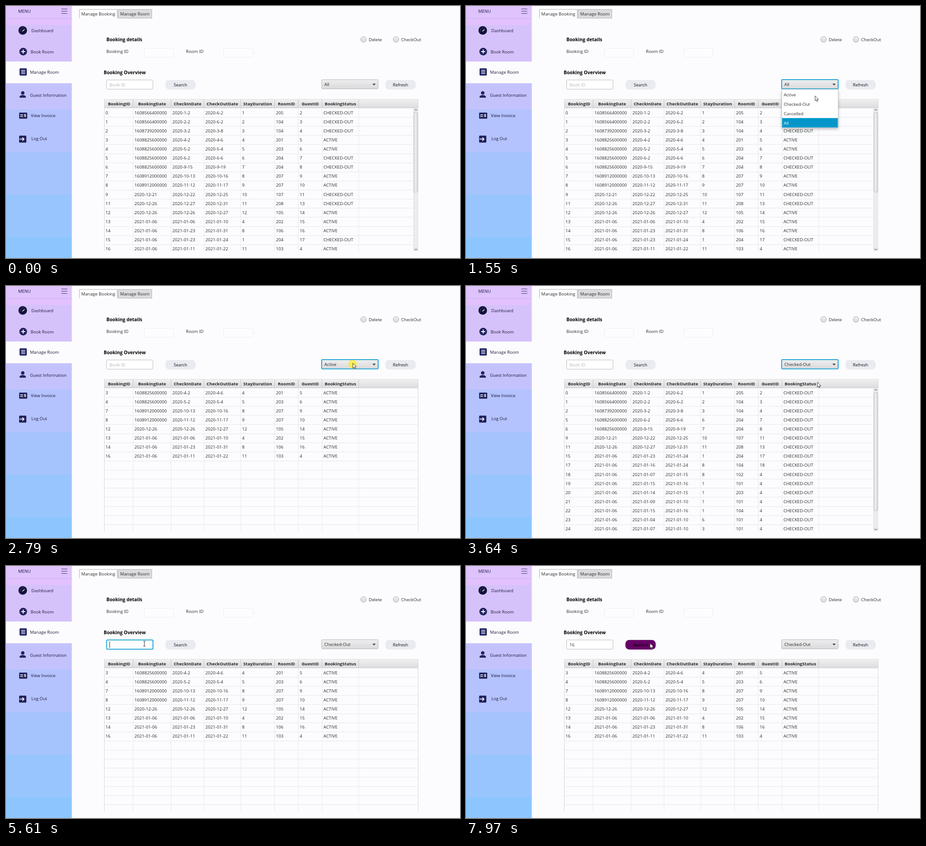
Animation, 1004 px wide and 558 px high, one loop 8000 ms. Source, as an HTML page:

```html
<!DOCTYPE html>
<html lang="en">
<head>
<meta charset="utf-8">
<title>Manage bookings</title>
<style>
html, body { margin: 0; width: 100%; height: 100%; overflow: hidden; background: #fcfcfe; }
svg { display: block; width: 1004px; height: 558px; }
text { font: 9.65px "Open Sans", "Noto Sans", sans-serif; fill: #2b2b2b; white-space: pre; }
.side text { font-size: 9.5px; fill: #1c1b3c; }
.bold { font-weight: 700; }
.title { font-size: 10.3px; fill: #000; }
.head { font-size: 9.6px; fill: #262626; }
.mid { text-anchor: middle; }
.btn text { font-size: 9.5px; fill: #111; }
.hint { fill: #b4b4b8; }
</style>
</head>
<body>
<svg id="stage" viewBox="0 0 1004 558" xmlns="http://www.w3.org/2000/svg"></svg>
<script>
const LOOP = 8000;
const $ = id => document.getElementById(id);
const rect = (x, y, w, h, fill, more = '') =>
  `<rect x="${x}" y="${y}" width="${w}" height="${h}" fill="${fill}" ${more}/>`;
const text = (x, y, str, cls = '') => `<text x="${x}" y="${y}" class="${cls}">${str}</text>`;
const path = (d, more) => `<path d="${d}" ${more}/>`;
const circle = (x, y, r, more) => `<circle cx="${x}" cy="${y}" r="${r}" ${more}/>`;
const fade = (id, stops, dir = 'x2="0" y2="1"') => `<linearGradient id="${id}" ${dir}>` +
  stops.map((c, i) => `<stop offset="${i / (stops.length - 1)}" stop-color="${c}"/>`).join('') +
  '</linearGradient>';

const NAVY = '#23235f', BLUE = '#0496c9', LINE = '#e7e7ea';

// Bookings: check-in, check-out, room and, for January 2021, the stay
const bookings = `1-2 6-2 205|2-2 6-2 104|3-2 3-8 104|4-2 4-6 201|5-2 5-4 203|6-2 6-6 204
9-15 9-19 204|10-13 10-16 207|11-12 11-17 207|12-22 12-25 107|12-27 12-31 208|12-26 12-27 105
06 10 202 4|23 31 106 8|23 24 204 1|11 22 103 11|16 24 104 8|07 15 102 8|15 16 101 1
14 15 203 1|09 10 101 1|15 16 104 1|04 10 101 6|07 10 101 3`.split(/[|\n]/).map((line, i) => {
  const [from, to, room, stay = i + 1] = line.split(' ');
  const id = i + (i > 9);
  const year = id < 13 ? '2020-' : '2021-01-';
  const active = [3, 4, 7, 8, 12, 13, 14, 16].includes(id);
  const guest = id < 16 ? id + 2 : id === 17 ? 18 : 4;
  return [id, bookedOn(id), year + from, year + to, stay, room, guest,
    active ? 'ACTIVE' : 'CHECKED-OUT'];
});

function bookedOn(id) {
  if (id < 2) return '1608566400000';
  if (id < 3) return '1608739200000';
  if (id < 7) return '1608825600000';
  if (id < 9) return '1608912000000';
  return id < 10 ? '2020-12-21' : id < 13 ? '2020-12-26' : '2021-01-06';
}

const edges = [217, 281, 365, 438, 519, 594, 646.5, 699, 780];
const heads = ['BookingID', 'BookingDate', 'CheckInDate', 'CheckOutDate', 'StayDuration',
  'RoomID', 'GuestID', 'BookingStatus'];
const PITCH = 20.12;

function rowsOf(id, list, thumbEnd) {
  let out = `<g id="${id}">`;
  list.slice(0, 16).forEach((row, r) => row.forEach((cell, c) => {
    out += text(edges[c] + 3.1, 239.5 + r * PITCH, cell);
  }));
  if (thumbEnd) {
    out += rect(901, 226, 11, 317, '#ececee') +
      path('M901.5 226V543', 'stroke="#dcdcde"') +
      rect(902.5, 235.5, 8, thumbEnd - 235.5, 'url(#thumb)', 'rx="2" stroke="#bcbcbe"') +
      path('M903.5 231.5l3-3 3 3M903.5 537.5l3 3 3-3', 'fill="none" stroke="#777" stroke-width="1.2"');
  }
  return out + '</g>';
}

function grid() {
  let d = '';
  for (let r = 1; r < 16; r++) d += `M217 ${Math.round(226 + r * PITCH) + .5}H912`;
  edges.slice(1).forEach(x => d += `M${x} 226V543`);
  let hd = '';
  edges.slice(1).forEach(x => hd += `M${x} 207V225`);
  return path(d, `stroke="${LINE}" fill="none"`) +
    rect(217, 206, 695, 20, 'url(#head)') +
    path(hd, 'stroke="#c6c6c8"') +
    path('M217 206H912M217 225.7H912', 'stroke="#cfcfd1"') +
    path('M217.5 206V543M911.5 206V543', 'stroke="#d6d6d8"') +
    heads.map((h, i) => text((edges[i] + edges[i + 1]) / 2 + (i ? 0 : 1), 219.6, h, 'bold head mid')).join('');
}

function sidebar() {
  const bands = [[0, '#dfc3fd'], [27, '#e2c1fe'], [42, '#d6c2fb'], [123, '#fcfcfe'], [171, '#c4c2fc'],
    [229, '#b4c2fd'], [324, '#a5c3fc'], [418, '#98c5fd'], [512, '#8dc6fe']];
  const white = w => `fill="none" stroke="#fff" stroke-width="${w}"`;
  return '<g class="side">' +
    bands.map(([y, c], i) => rect(0, y, 145.5, (bands[i + 1] || [558])[0] - y, c)).join('') +
    path('M0 27.5H145.5', 'stroke="#cbb2ea"') +
    path('M122.5 6.5H135.5M122.5 11.5H135.5M122.5 16.5H135.5', 'stroke="#3a3560" stroke-width="1.2"') +
    text(27, 14.5, 'MENU') +
    circle(37, 54, 9.5, 'fill="#12103a"') +
    path('M36 56l5-4', white(1.6)) +
    path('M31.5 56a6 6 0 0 1 10-6', 'fill="none" stroke="#cfc6ee" stroke-dasharray="1 2.4"') +
    text(56, 57.7, 'Dashboard') +
    circle(38, 101, 8.5, `fill="${NAVY}"`) +
    path('M33.5 101h9M38 96.5v9', white(1.8)) +
    text(54.5, 104.7, 'Book Room') +
    rect(30, 138, 16, 16, NAVY, 'rx="2"') +
    path('M33.5 142.5h9M33.5 146h9M33.5 149.5h9', white(1.5)) +
    text(53, 150.2, 'Manage Room') +
    circle(37, 192.5, 3.8, `fill="${NAVY}"`) +
    path('M30 203v-1.5c0-3 4-4.3 7-4.3s7 1.3 7 4.3v1.5z', `fill="${NAVY}"`) +
    text(53, 201.2, 'Guest Information') +
    rect(29, 236, 18, 13.5, NAVY, 'rx="1.5"') +
    path('M31.5 241h6M31.5 244.5h6', white(1.4)) +
    '<text x="39.5" y="246.3" class="bold" style="fill:#fff">$</text>' +
    text(55, 246.2, 'View Invoice') +
    rect(29, 287, 16, 15.5, NAVY, 'rx="1.5"') +
    path('M30 294.7h9.5M36 291l3.8 3.7-3.8 3.7', white(1.7)) +
    text(56, 296.7, 'Log Out') + '</g>';
}

const button = (id, x, label) => `<g class="btn">` +
  `<rect id="${id}" x="${x}" y="163.7" width="67" height="21.3" rx="8.5"/>` +
  `<text id="${id}Text" x="${x + 33.5}" y="177.6" class="mid">${label}</text></g>`;
const radio = (x, label) => circle(x, 74, 6.3, 'fill="url(#knob)" stroke="#adadaf"') +
  text(x + 11.5, 77.7, label);
const field = x => rect(x, 93.5, 64, 20, '#fdfdff', 'rx="2" stroke="#ededf1"');

const choices = ['Active', 'Checked-Out', 'Cancelled', 'All'];
const popup = '<g id="popup">' +
  rect(698.5, 185, 124.5, 84, '#fff', 'filter="url(#shadow)"') +
  rect(698.5, 184.5, 124.5, 84.5, '#fff', 'stroke="#c8c8ca"') +
  choices.map((c, i) => `<g id="item${i}">` +
    rect(699, 185 + i * 21, 123.5, 21, BLUE) +
    rect(700, 186 + i * 21, 121.5, 19, 'none', 'stroke="#2bb0e0" stroke-width=".8"') + '</g>' +
    `<text id="label${i}" x="702.7" y="${199.5 + i * 21}">${c}</text>`).join('') + '</g>';

$('stage').innerHTML = '<defs>' +
  fade('head', ['#f1f1f2', '#dcdcde']) + fade('combo', ['#eeeeef', '#dadadc']) +
  fade('knob', ['#f0f0f1', '#d9d9db']) + fade('thumb', ['#f3f3f4', '#dcdcde'], 'x2="1" y2="0"') +
  fade('hover', ['#e0c3fc', '#8ec5fc'], 'x2="1" y2="0"') +
  '<clipPath id="body"><rect x="217" y="206" width="695" height="337.5"/></clipPath>' +
  '<filter id="shadow" x="-10%" y="-10%" width="120%" height="130%">' +
  '<feDropShadow dx="0" dy="3" stdDeviation="3" flood-opacity=".3"/></filter></defs>' +
  rect(0, 0, 1004, 558, '#fcfcfe') + sidebar() +
  rect(162.5, 7.5, 83.5, 20, '#fdfdff') + path('M162.5 27V7.5H246V27', 'fill="none" stroke="#b3b3b5"') +
  rect(247.5, 7.5, 75, 19.5, '#dcdcde', 'stroke="#b3b3b5"') +
  text(166.5, 20.7, 'Manage Booking') + text(252.5, 20.7, 'Manage Room') +
  text(222, 78, 'Booking details', 'bold title') + text(216, 151, 'Booking Overview', 'bold title') +
  text(222, 103.8, 'Booking ID') + text(398, 103.8, 'Room ID') + field(306.3) + field(481.5) +
  radio(790.7, 'Delete') + radio(862.5, 'CheckOut') +
  '<rect id="input" x="222.5" y="163.8" width="102.5" height="20.4" rx="2" fill="#fff"/>' +
  '<text id="typed" x="229" y="177.7"></text>' +
  path('M229 167V181.5', 'id="caret" stroke="#222"') +
  button('search', 352.5, 'Search') + button('refresh', 839, 'Refresh') +
  '<rect id="combo-box" x="698" y="163" width="125" height="20.5" rx="2" fill="url(#combo)"/>' +
  '<text id="choice" x="704" y="177.2"></text>' + path('M810.5 172h7l-3.5 3.8z', 'fill="#333"') +
  '<g clip-path="url(#body)">' + grid() +
  rowsOf('all', bookings, 412) +
  rowsOf('active', bookings.filter(b => b[7] === 'ACTIVE')) +
  rowsOf('out', bookings.filter(b => b[7] !== 'ACTIVE'), 497.5) + '</g>' + popup +
  '<g id="pointer">' + circle(-.5, 2, 9.5, 'id="ring" fill="#fff000" opacity=".62"') +
  path('M0 0V11L2.6 8.7 4.3 12.5 6 11.7 4.3 8H7.8Z', 'id="arrow" fill="#fff" stroke="#222" stroke-width=".9"') +
  path('M-2.3-5.5H-.6L0-5 .6-5.5H2.3M0-5V5M-2.3 5.5H-.6L0 5 .6 5.5H2.3',
    'id="beam" fill="none" stroke="#222"') + '</g>';

// Pointer moves: first step, last step, number of steps, points passed
const moves = [
  [70, 860, 11, '972,552 928,445 843,262 790,158 786,140 784,141 782,146 780,154 778,163 777,170 776,173'],
  [1090, 1780, 10, '776,173 776,173 776,173 776,173 776,180 774,190 772,199 771,205 771,209 771,212'],
  [2030, 2090, 2, '770,205 770,200'],
  [2250, 2870, 9, '770,200 770,200 770,199 769,191 768,182 767,174 767,171 767,171 767,171'],
  [3010, 3410, 6, '768,178 770,186 773,197 776,206 777,213 777,213'],
  [3640, 4420, 11, '777,213 785,208 805,198 832,186 855,178 868,174 873,172'],
  [4660, 5460, 11, '866,172 617,177 335,178 308,171 306,172'],
  [7560, 7720, 3, '330,171 372,171 407,171']
].map(([from, to, n, pts]) => ({ from, to, n, pts: pts.split(' ').map(p => p.split(',').map(Number)) }));

function pointerAt(t) {
  const m = moves.filter(v => t >= v.from).pop();
  if (!m) return null;
  const step = Math.min(m.n - 1, Math.floor((t - m.from) / (m.to - m.from) * (m.n - 1) + 1e-6));
  const last = m.pts.length - 1;
  const pos = step / (m.n - 1) * last;
  const i = Math.min(last - 1, Math.floor(pos));
  return m.pts[i].map((a, k) => a + (m.pts[i + 1][k] - a) * (pos - i));
}

const within = (t, ...spans) => spans.some(([a, b]) => t >= a && t < b);
const show = (id, on) => $(id).setAttribute('display', on ? 'inline' : 'none');
const set = (id, attrs) => { for (const k in attrs) $(id).setAttribute(k, attrs[k]); };

function paintButton(id, left, x, pressed) {
  const over = x >= left && x <= left + 67;
  set(id, { fill: pressed ? '#660066' : over ? 'url(#hover)' : '#eaebf1' });
  $(id + 'Text').style.fontWeight = over ? 700 : 400;
}

function paintFocus(id, on, idle) {
  set(id, { stroke: on ? '#26a7d3' : idle, 'stroke-width': on ? 2 : 1 });
}

function draw(t) {
  const pos = pointerAt(t);
  const [x, y] = pos || [-50, -50];
  const onRow = y < 190;
  const inInput = onRow && x > 222 && x < 325;
  set('pointer', { transform: `translate(${x} ${y})` });
  show('arrow', pos && !inInput);
  show('beam', inInput);
  show('ring', within(t, [1090, 1250], [2250, 2405], [2785, 2870], [3410, 3640], [4340, 4420], [5530, 5610]));

  paintButton('search', 352.5, onRow ? x : 0, t >= 7880);
  paintButton('refresh', 839, onRow ? x : 0, within(t, [4180, 4340]));
  paintFocus('combo-box', within(t, [1165, 4180]), '#b6b6b8');
  paintFocus('input', within(t, [5530, 7880]), '#b9b9bb');

  const picked = t < 2405 ? 3 : t < 3640 ? 0 : 1;
  const hovered = within(t, [1620, 2030], [3250, 3640]) ? 1 : within(t, [2030, 2405]) ? 0 : -1;
  const open = within(t, [1243, 2405], [2870, 3640]);
  $('choice').textContent = choices[picked];
  show('popup', open);
  choices.forEach((c, i) => {
    const lit = i === picked || i === hovered;
    show('item' + i, lit);
    $('label' + i).style.fill = lit ? '#fff' : '#303030';
  });

  const view = t < 2405 ? 'all' : t < 3640 ? 'active' : t < 4340 ? 'out' : 'active';
  ['all', 'active', 'out'].forEach(v => show(v, v === view));

  const value = '16'.slice(0, (t >= 6620) + (t >= 7390));
  $('typed').textContent = t < 5530 ? 'Book ID' : value;
  $('typed').setAttribute('class', t < 5530 ? 'hint' : '');
  show('caret', within(t, [5610, 6160], [6620, 7180], [7390, 7880]));
  set('caret', { transform: `translate(${.3 + value.length * 5.5} 0)` });
}

const start = performance.now();
function tick() {
  draw((performance.now() - start) % LOOP);
  requestAnimationFrame(tick);
}
tick();
</script>
</body>
</html>
```
